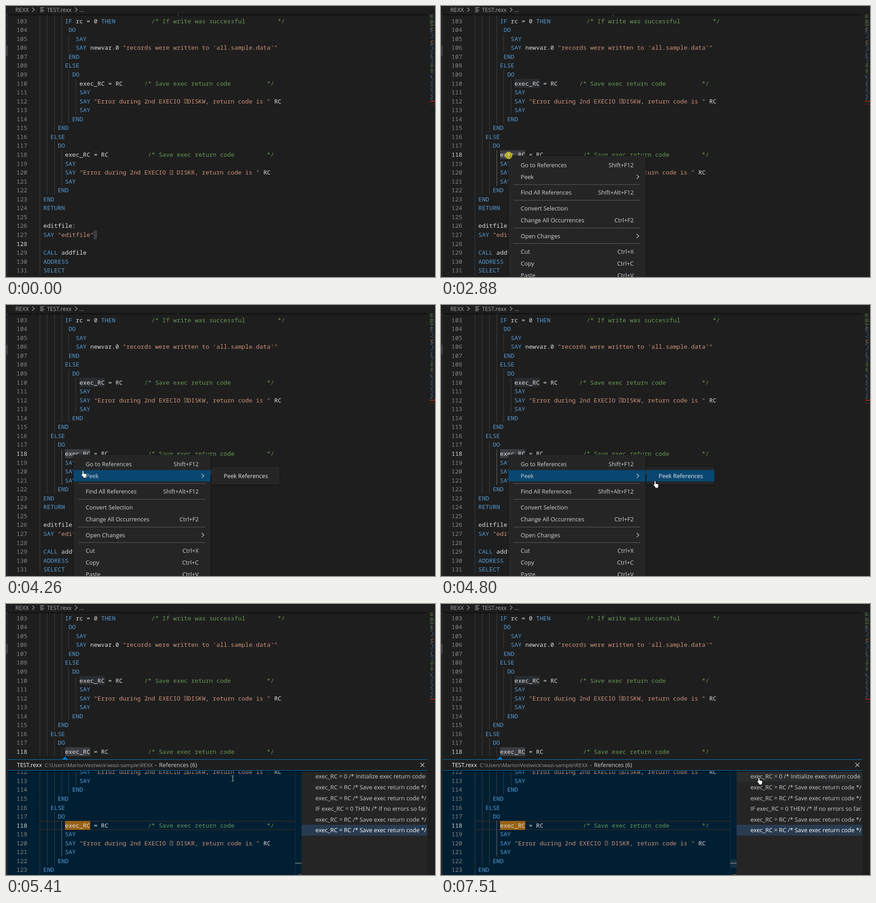
Animation, 942 px wide and 595 px high, one loop 8 s. Source, as an HTML page:

```html
<!DOCTYPE html>
<html lang="en">
<head>
<meta charset="utf-8">
<title>Peek references</title>
<style>
html, body { margin: 0; width: 100%; height: 100%; overflow: hidden; background: #1e1e1e; }
svg { display: block; }
text { white-space: pre; font: 12.7px "Open Sans", "Noto Sans", sans-serif; }
.code text { font: 500 13.2px "Noto Sans Mono", "DejaVu Sans Mono", monospace; }
</style>
</head>
<body>
<svg id="stage" width="942" height="595" viewBox="0 0 942 595"></svg>
<script>
const LOOP = 8000;
const COL0 = 74.1, CHAR = 7.92, LINE = 19.56, FIRST = 103, FIRST_Y = 33;
const COLORS = { keyword: '#569cd6', string: '#ce9178', comment: '#6a9955', plain: '#dcdcdc' };
const MISSING = '\u00a4'; // stands for a character the editor cannot show

// Source lines from 102 on: [indent, code, guide depth if it differs]
const SOURCE = [
  [30, '/* Verify', 7],
  [7, 'IF rc = 0 THEN          /* If write was successful         */'],
  [8, 'DO'],
  [10, 'SAY'],
  [10, `SAY newvar.0 "records were written to 'all.sample.data'"`],
  [8, 'END'],
  [7, 'ELSE'],
  [9, 'DO'],
  [11, 'exec_RC = RC      /* Save exec return code          */'],
  [11, 'SAY'],
  [11, `SAY "Error during 2nd EXECIO ${MISSING}DISKW, return code is " RC`],
  [11, 'SAY'],
  [9, 'END'],
  [5, 'END'],
  [3, 'ELSE'],
  [5, 'DO'],
  [7, 'exec_RC = RC           /* Save exec return code         */'],
  [7, 'SAY'],
  [7, `SAY "Error during 2nd EXECIO ${MISSING} DISKR, return code is " RC`],
  [7, 'SAY'],
  [5, 'END'],
  [1, 'END'],
  [1, 'RETURN'],
  [1, ''],
  [1, 'editfile:'],
  [1, 'SAY "editfile"'],
  [1, ''],
  [1, 'CALL addfile'],
  [1, 'ADDRESS'],
  [1, 'SELECT'],
];

const escapeText = s => s.replace(/&/g, '&amp;').replace(/</g, '&lt;');
const rect = (x, y, w, h, fill, extra = '') =>
  `<rect x="${x}" y="${y}" width="${w}" height="${h}" fill="${fill}" ${extra}/>`;
const text = (x, y, s, fill, extra = '') =>
  `<text x="${x}" y="${y}" fill="${fill}" ${extra}>${escapeText(s)}</text>`;
const stroke = (d, color, width = 1) =>
  `<path d="${d}" fill="none" stroke="${color}" stroke-width="${width}"/>`;
const chevron = (x, y, color) => stroke(`M${x - 2.5} ${y - 4.5}l5 4.5l-5 4.5`, color, 1.1);
const size = px => `style="font-size:${px}px"`;
const colX = col => COL0 + col * CHAR;
const lineY = n => FIRST_Y + (n - FIRST) * LINE;

function tokenColor(token) {
  if (token.startsWith('/*')) return COLORS.comment;
  if (token.startsWith('"')) return COLORS.string;
  return /^(IF|THEN|DO|SAY|END|ELSE|RETURN|CALL|ADDRESS|SELECT)$/.test(token)
    ? COLORS.keyword : COLORS.plain;
}

function missingGlyph(x, y) {
  return `<rect x="${x + 1}" y="${y - 4.5}" width="6" height="9" fill="none" stroke="${COLORS.string}" stroke-width=".8"/>`
    + text(x + 2, y + 3, '?', COLORS.string, size(7));
}

function codeLine(n) {
  const [indent, code, depth = indent] = SOURCE[n - 102];
  const y = lineY(n);
  let out = '';
  for (let col = 0; col < depth; col += 2) {
    const active = col === 6 && n >= 118 && n <= 121;
    out += rect(Math.round(colX(col)), y - LINE / 2, 1, LINE, active ? '#707070' : '#404040',
      active ? 'class="guide"' : '');
  }
  for (const m of code.matchAll(/\/\*.*|"[^"]*"|[^\s"]+/g)) {
    const x = colX(indent + m.index);
    out += text(x, y + 4.6, m[0].replace(MISSING, ' '), tokenColor(m[0]));
    const hole = m[0].indexOf(MISSING);
    if (hole >= 0) out += missingGlyph(x + hole * CHAR, y);
  }
  return out + text(23, y + 4.6, String(n), '#858585', `class="n${n}"`);
}

function codeBlock(from, to) {
  let out = '';
  for (let n = from; n <= to; n++) out += codeLine(n);
  return out;
}

const word = (id, col, n) =>
  rect(colX(col), lineY(n) - LINE / 2, 7 * CHAR, LINE, '#333a40', `id="${id}"`);

const currentLine = right =>
  stroke(`M75 ${lineY(118) - 9.2}H${right}M75 ${lineY(118) + 9.2}H${right}`, '#282828', 2);

function minimap() {
  let seed = 11;
  const random = () => (seed = (seed * 16807) % 2147483647) / 2147483647;
  const bands = [
    [19, 27, '#6a9955', 1], [30, 39, '#6a9955', 1], [41, 45, '#6a9955', 1],
    [47, 56, '#8fa3a8', .7], [57, 72, '#569cd6', .5], [76, 83, '#ce9178', .8],
    [84, 125, '#569cd6', .5], [126, 135, '#6a9955', .8], [138, 147, '#6a9955', .8],
    [150, 206, '#569cd6', .5],
  ];
  let out = '';
  for (const [top, bottom, color, fullness] of bands) {
    for (let y = top; y < bottom; y += 2) {
      const x = 931 + (1 - fullness) * 12 * random();
      const w = (942 - x) * fullness * (.4 + .6 * random());
      out += rect(x, y, w, 1, color, 'opacity=".65"');
    }
  }
  return out + rect(931, 208, 11, 2, '#a32a20') + rect(931, 215, 11, 1, '#7a211a');
}

function breadcrumb() {
  const gray = '#a9a9a9';
  return rect(0, 0, 942, 18, '#1e1e1e') + rect(4, 18, 921, 4, 'url(#shade)')
    + text(20.5, 12.5, 'REXX', gray) + chevron(60, 8, gray)
    + stroke('M75 3.5h9M75 6.5h6M75 9.5h9M75 12.5h7', '#c5c5c5')
    + text(90, 12.5, 'TEST.rexx', gray, size(12.3)) + chevron(154, 8, gray)
    + text(161, 12.5, '...', gray);
}

function menuItem(y, label, keys, id) {
  return (id ? rect(148, y - 12.5, 301, 25, '#094771', `id="${id}"`) : '')
    + text(175, y + 4.5, label, '#d4d4d4')
    + (keys === '>' ? chevron(432, y, '#d4d4d4')
      : text(423, y + 4.5, keys, '#d4d4d4', 'text-anchor="end"'));
}

function menu() {
  const rules = [392, 426.5, 487.5, 521.5].map(y => `M159 ${y}H438`).join('');
  return rect(146, 327, 306, 280, '#000', 'opacity=".2" rx="2"')
    + rect(148, 329, 301.5, 270, '#252526')
    + menuItem(349, 'Go to References', 'Shift+F12', 'goRow')
    + menuItem(375, 'Peek', '>', 'peekRow')
    + menuItem(409.5, 'Find All References', 'Shift+Alt+F12')
    + menuItem(444.5, 'Convert Selection', '')
    + menuItem(470.5, 'Change All Occurrences', 'Ctrl+F2')
    + menuItem(505, 'Open Changes', '>')
    + menuItem(539.5, 'Cut', 'Ctrl+X')
    + menuItem(565.5, 'Copy', 'Ctrl+C')
    + menuItem(591.5, 'Paste', 'Ctrl+V')
    + stroke(rules, '#606060')
    + '<g id="submenu">' + rect(449, 354, 154, 43, '#000', 'opacity=".2" rx="2"')
    + rect(451, 355, 149.5, 39, '#252526')
    + rect(451, 362.5, 149.5, 25, '#094771', 'id="subRow"')
    + text(478, 379.5, 'Peek References', '#e8e8e8') + '</g>';
}

const ROW_TOP = 366.5, ROW = 23.65;

function peekList() {
  const save = 'exec_RC = RC /* Save exec return code */';
  const rows = ['exec_RC = 0 /* Initialize exec return code', save, save,
    'IF exec_RC = 0 THEN /* If no errors so far...', save, save];
  return rect(649, 366, 276, 229, '#252526')
    + rect(649, ROW_TOP, 276, ROW, '#2a2d2e', 'id="hover"')
    + rect(649, ROW_TOP + 5 * ROW, 276, ROW, '#283c51')
    + '<g clip-path="url(#listClip)">'
    + rows.map((s, i) => text(679.5, ROW_TOP + (i + .5) * ROW + 4.9, s,
      i === 5 ? '#ffffff' : '#cccccc', size(12.85))).join('') + '</g>'
    + rect(649, 366, 276, 4, 'url(#shade)');
}

function peek() {
  return rect(4, 334.2, 921, 7, '#1e1e1e')
    + '<path d="M123.500 341l6-6l6 6z" fill="#007acc"/>'
    + rect(4, 341, 921, 24, '#1e1e1e')
    + rect(4, 366, 645, 229, '#001f33')
    + '<g clip-path="url(#peekClip)"><g class="code" transform="translate(0 159.7)">'
    + currentLine(635)
    + rect(colX(7), lineY(118) - LINE / 2, 7 * CHAR, LINE, '#996214')
    + codeBlock(112, 123) + '</g></g>'
    + rect(4, 366, 645, 4, 'url(#shade)')
    + rect(635, 366, 1, 229, '#16303f')
    + rect(636, 561, 13, 18, '#143245', 'id="slider"')
    + rect(635, 568.5, 14, 1.2, '#a0a0a0') + rect(641, 594, 8, 1, '#c46a20')
    + peekList()
    + rect(4, 341, 921, 1, '#007acc') + rect(4, 365, 921, 1, '#007acc')
    + text(24, 358, 'TEST.rexx', '#ffffff', size(12.5))
    + text(85, 358, 'C:\\Users\\MarlonVestwick\\wazi-sample\\REXX', '#9a9a9a', size(11.6))
    + text(327, 358, '-', '#cccccc') + text(336, 358, 'References (6)', '#d4d4d4')
    + stroke('M910 349l8.500 8.500M918.500 349l-8.500 8.500', '#d0d0d0', 1.1);
}

const pointer = `
  <g id="ibeam">${stroke('M-2.500 -6h2M.500 -6h2M-2.500 6h2M.500 6h2M0 -5.500v11', '#d0d0d0', 1.1)}</g>
  <path id="hand" fill="#fff" stroke="#111" stroke-width=".8" stroke-linejoin="round"
    d="M-1.500 1q1.500-1.600 3 0v5l5 1.200q1.500.5 1.300 2.300l-1 4v2.300h-6.300v-1.800l-4-4.500q-1-1.800.8-2l1.200 1z"/>`;

document.getElementById('stage').innerHTML = `
  <defs>
    <linearGradient id="shade" x2="0" y2="1"><stop stop-color="#000" stop-opacity=".6"/>
      <stop offset="1" stop-color="#000" stop-opacity="0"/></linearGradient>
    <clipPath id="peekClip">${rect(4, 366, 631, 229, '#000')}</clipPath>
    <clipPath id="listClip">${rect(649, 366, 275.5, 229, '#000')}</clipPath>
  </defs>
  ${rect(0, 0, 942, 595, '#1e1e1e')}
  <g id="editor" class="code">
    ${rect(colX(15) - .5, lineY(127) - LINE / 2, 7.5, LINE, '#3a3d41', 'id="oldSelection" rx="2"')}
    <g id="lineFrame">${currentLine(924)}</g>
    ${word('word110', 11, 110)}${word('word118', 7, 118)}
    ${codeBlock(102, 131)}
    ${rect(145.5, lineY(118) - 9.5, 1.4, 19, '#d0d0d0', 'id="caret"')}
  </g>
  ${rect(0, 0, 4, 595, '#252526')}${rect(0, 87, 4, 22, '#3f3f46')}
  ${rect(0, 20, 4, 1, '#3a3a3a')}${rect(0, 41, 4, 1, '#3a3a3a')}
  ${minimap()}${breadcrumb()}
  <g id="menu">${menu()}</g>
  <g id="peek">${peek()}</g>
  <circle id="halo" r="8.300" fill="#e6d800" fill-opacity=".65"/>
  <g id="pointer">${pointer}</g>`;

const el = id => document.getElementById(id);
const show = (id, on) => el(id).setAttribute('visibility', on ? 'inherit' : 'hidden');
const fill = (id, color) => el(id).setAttribute('fill', color);
const editorNumber = n => document.querySelector(`#editor .n${n}`);
const editorGuides = document.querySelectorAll('#editor .guide');
document.querySelector('#peek .n118').setAttribute('fill', '#d6d6d6');

// Pointer stops: [time, x, y]
const STOPS = [
  [340, 762, 604], [1140, 154, 352], [1200, 154, 351], [1620, 151, 330], [1770, 148.5, 328],
  [3060, 148.5, 328], [3110, 151, 328], [3300, 151, 328], [3640, 158, 361], [3800, 160, 373],
  [4030, 160, 363], [4200, 160, 363], [4800, 470, 386], [4970, 496, 384], [5180, 497, 384],
  [5340, 498, 383], [6450, 498, 383], [7080, 690, 466], [7280, 701, 421], [7510, 698, 381],
];

function pointerAt(t) {
  const i = STOPS.findIndex(s => s[0] > t);
  if (i < 0) return STOPS[STOPS.length - 1].slice(1);
  if (i === 0) return STOPS[0].slice(1);
  const [t0, x0, y0] = STOPS[i - 1], [t1, x1, y1] = STOPS[i];
  const u = (t - t0) / (t1 - t0), e = u * u * (3 - 2 * u);
  return [x0 + (x1 - x0) * e, y0 + (y1 - y0) * e];
}

function draw(t) {
  const within = (a, b) => t >= a && t < b;
  const [x, y] = pointerAt(t);
  const clicked = t >= 1840, selected = t >= 2020, peeking = t >= 5410;
  const menuOpen = within(2880, 5340), submenuOpen = within(4000, 5340);
  const focused = within(2020, 2730) || within(5340, 5410);

  el('editor').setAttribute('transform', `translate(0 ${peeking ? -2 : 0})`);
  show('oldSelection', !clicked);
  show('lineFrame', clicked && !selected);
  show('word118', selected);
  show('word110', t >= 2070);
  fill('word118', focused ? '#264f78' : '#3a3d41');
  fill('word110', focused ? '#333a40' : '#2a2d30');
  editorNumber(128).setAttribute('fill', clicked ? '#858585' : '#d6d6d6');
  editorNumber(118).setAttribute('fill', clicked ? '#d6d6d6' : '#858585');
  editorGuides.forEach(g => g.setAttribute('fill', clicked && !peeking ? '#707070' : '#404040'));
  show('caret', within(1840, 2500) || within(5340, 5410));
  el('caret').setAttribute('x', selected ? 185.5 : 145.5);

  show('menu', menuOpen);
  show('goRow', within(3420, 3720));
  show('peekRow', menuOpen && t >= 3720);
  show('submenu', submenuOpen);
  show('subRow', submenuOpen && x > 451);

  show('peek', peeking);
  show('slider', t >= 5490);
  const row = Math.floor((y - ROW_TOP) / ROW);
  const overList = peeking && x > 649;
  show('hover', overList && row >= 0 && row < 5);
  el('hover').setAttribute('y', ROW_TOP + row * ROW);

  const hand = within(3110, 5340) || overList;
  show('hand', t >= 380 && hand);
  show('ibeam', t >= 380 && !hand);
  el('pointer').setAttribute('transform', `translate(${x} ${y})`);
  show('halo', within(1770, 2070) || within(2730, 2950) || within(5100, 5340));
  el('halo').setAttribute('transform', `translate(${x} ${y})`);
}

const start = performance.now();
function tick() {
  draw((performance.now() - start) % LOOP);
  requestAnimationFrame(tick);
}
tick();
</script>
</body>
</html>
```
